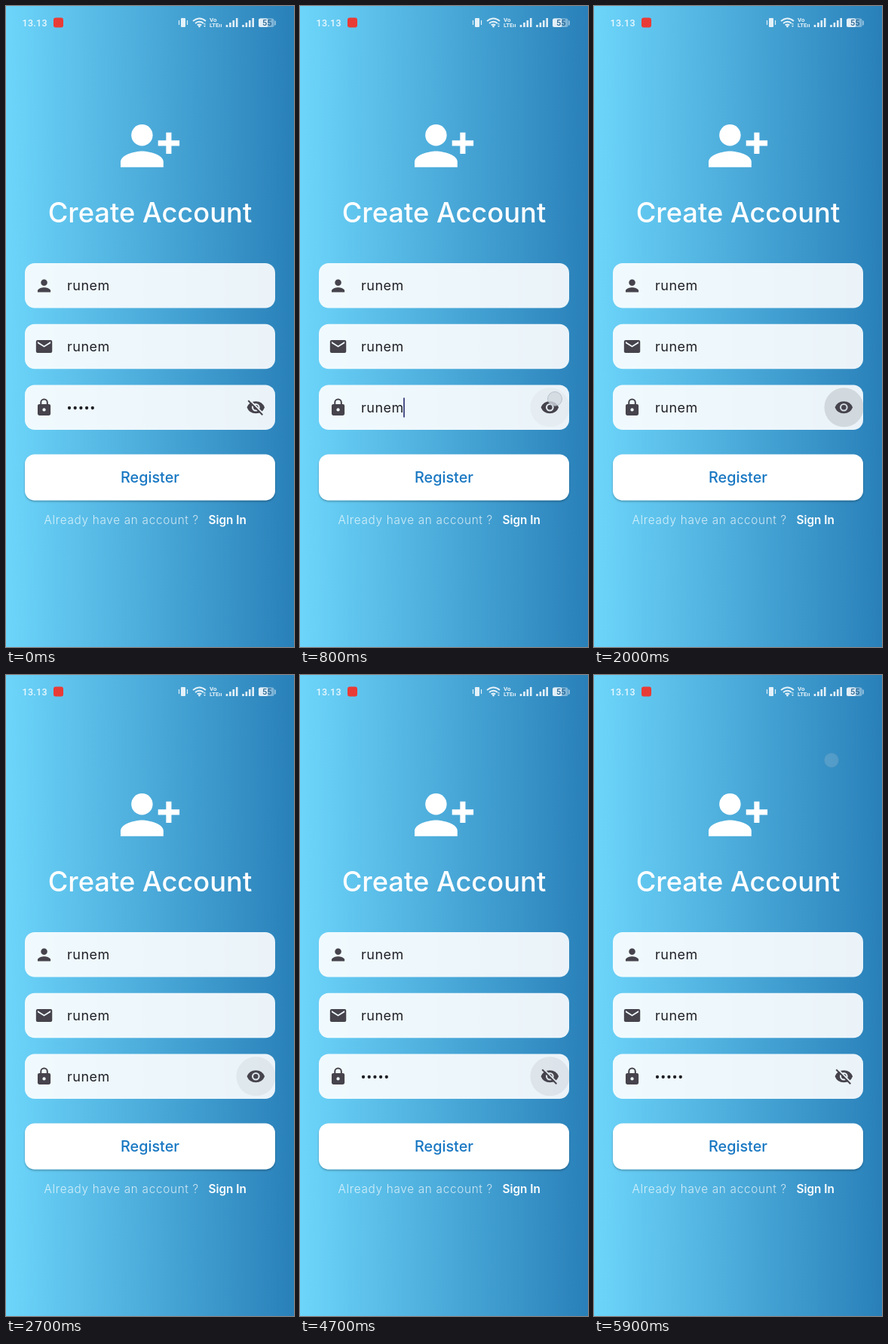
Write an HTML page that moves like this. It is 382 px wide and 850 px high and loops after 6000 ms.

```html
<!DOCTYPE html>
<html lang="en">
<head>
<meta charset="utf-8">
<title>Create Account</title>
<style>
  html, body { margin: 0; width: 100%; height: 100%; overflow: hidden; }
  svg { display: block; width: 100%; height: 100%; }
  text { font-family: Inter, sans-serif; }
  .status text { font-family: Roboto, sans-serif; font-weight: 500; }
  .name { font-size: 18px; letter-spacing: .5px; fill: #202027; }
  .icon { fill: #46434d; }
  .icon .hole { fill: #f0f9fd; }
</style>
</head>
<body>
<svg viewBox="0 0 382 850">
  <defs>
    <linearGradient id="sky">
      <stop stop-color="#6dd5fa"/><stop offset="1" stop-color="#2980b9"/>
    </linearGradient>
    <filter id="shadow" x="-5%" y="-10%" width="110%" height="130%">
      <feDropShadow dx="0" dy="1.5" stdDeviation="1.3" flood-opacity=".3"/>
    </filter>
    <rect id="box" x="25" width="332" height="59.5" rx="13"/>
    <clipPath id="inside"><use href="#box" y="502.5"/></clipPath>
    <path id="bars" d="M0 28v-3m4.4 3v-6m4.4 6v-9m4.4 9v-12" stroke="#fff" stroke-width="2.6"/>
    <g id="person">
      <circle cx="12" cy="8" r="4"/>
      <path d="M4 20v-2c0-2.66 5.33-4 8-4s8 1.34 8 4v2z"/>
    </g>
    <g id="eye">
      <path fill-rule="evenodd" d="M1 12a11.8 11.8 0 0 1 22 0 11.8 11.8 0 0 1-22 0zM7 12a5 5 0 0 0 10 0 5 5 0 0 0-10 0z"/>
      <circle cx="12" cy="12" r="3"/>
    </g>
    <mask id="slit">
      <rect width="24" height="24" fill="#fff"/>
      <path d="M3 1.5l20 20" stroke="#000" stroke-width="1.8"/>
    </mask>
  </defs>
  <rect width="382" height="850" fill="url(#sky)"/>

  <g class="status" fill="#fff" opacity=".86">
    <text x="21.5" y="26.5" font-size="12.5" letter-spacing=".3">13.13</text>
    <rect x="232" y="16" width="6" height="12" rx="1"/>
    <path d="M229.5 19v6m11-6v6" stroke="#fff" stroke-width="1.2"/>
    <path d="M248 20q8.5-7 17 0m-14 3q5.500-4.500 11 0m-8.300 2.500q2.800-2 5.600 0" fill="none" stroke="#fff" stroke-width="1.8"/>
    <circle cx="256.5" cy="27" r="1.4"/>
    <path d="M262 24.5l1.500-2 1.500 2zm0 1.500l1.500 2 1.500-2z"/>
    <text x="270" y="21" font-size="8" style="font-weight: 700">Vo</text>
    <text x="270" y="28" font-size="7.600" style="font-weight: 700">LTEıı</text>
    <use href="#bars" x="293"/><use href="#bars" x="314.500"/>
    <rect x="335" y="16.500" width="20.500" height="11.500" rx="2.500" opacity=".45"/>
    <rect x="335" y="16.500" width="12.500" height="11.500" rx="2.500"/>
    <path d="M356 19l2 1v5l-2 1z" opacity=".5"/>
    <text x="340" y="26.300" font-size="11" fill="#245f8c">55</text>
  </g>
  <rect x="63" y="15.500" width="13" height="13" rx="3" fill="#e93b36"/>

  <g fill="#fff" transform="translate(148.450 142.800) scale(3.550)">
    <use href="#person" x="-3"/>
    <path d="M15 10h3V7h2v3h3v2h-3v3h-2v-3h-3z"/>
  </g>
  <text x="191" y="286.500" font-size="36.300" font-weight="500" fill="#fff" text-anchor="middle">Create Account</text>

  <g fill="#fff" fill-opacity=".9">
    <use href="#box" y="341"/><use href="#box" y="421.800"/><use href="#box" y="502.500"/>
  </g>
  <g class="icon" transform="translate(37.700 358.200) scale(1.070)"><use href="#person"/></g>
  <g class="icon" transform="translate(37.700 438.700) scale(1.070)">
    <rect x="2" y="4" width="20" height="16" rx="2"/>
    <path class="hole" d="M4 6l8 5 8-5v2l-8 5-8-5z"/>
  </g>
  <g class="icon" transform="translate(37.700 519.400) scale(1.070)">
    <rect x="4" y="8" width="16" height="14" rx="2"/>
    <path d="M8 8V6a4 4 0 0 1 8 0v2" fill="none" stroke="#46434d" stroke-width="1.900"/>
    <circle class="hole" cx="12" cy="15" r="2"/>
  </g>
  <text class="name" x="81" y="377">runem</text>
  <text class="name" x="81" y="458">runem</text>

  <circle id="ripple" cx="331.500" cy="532.300" r="26" fill="#46414b" clip-path="url(#inside)"/>
  <g id="shown">
    <text class="name" x="81" y="539">runem</text>
    <g class="icon" transform="translate(318.500 519.400) scale(1.070)"><use href="#eye"/></g>
  </g>
  <g id="masked">
    <path d="M84 533h32" stroke="#202027" stroke-width="4.300" stroke-linecap="round" stroke-dasharray="0 7.700"/>
    <g class="icon" transform="translate(318.500 519.400) scale(1.070)">
      <g mask="url(#slit)"><use href="#eye"/></g>
      <path d="M2.600 3.600l17.800 17.800" stroke="#46434d" stroke-width="1.800"/>
    </g>
  </g>
  <path id="cursor" d="M0 519.500v26" stroke="#4a5388" stroke-width="2"/>

  <rect x="25" y="594.500" width="332" height="61" rx="13" fill="#fff" filter="url(#shadow)"/>
  <text x="191" y="631.500" font-size="19.800" font-weight="500" fill="#1877c2" text-anchor="middle">Register</text>
  <text x="50.500" y="686.500" font-size="15.300" font-weight="300" letter-spacing=".7" fill="#fff" fill-opacity=".75">Already have an account ?</text>
  <text x="268.500" y="686.500" font-size="15.300" font-weight="600" fill="#fff">Sign In</text>
  <circle id="touch" r="9.500" fill="#d2d8df" stroke="#8f99a5" stroke-opacity=".6"/>
</svg>
<script>
const $ = id => document.getElementById(id);
const clamp = v => Math.min(1, Math.max(0, v));
const show = (id, on) => { $(id).style.display = on ? '' : 'none'; };
const LOOP = 6000;

const touches = [
  { from: 740, to: 1200, x: 338, y: 521 },
  { from: 1050, to: 1700, x: 343, y: 524 },
  { from: 3200, to: 3600, x: 340, y: 524 },
  { from: 5000, to: LOOP, x: 315, y: 113, slide: 32 },
];
const presses = touches.filter(touch => touch.y > 500);

// Fast rise after a press, then a slow fade.
const ripple = age => .17 * clamp(age / 300) * clamp((2200 - age) / 1400);

function draw(t) {
  const begun = list => list.filter(touch => touch.from <= t).pop();
  const press = begun(presses);
  const visible = t >= presses[0].from && t < presses[2].from;
  show('shown', visible);
  show('masked', !visible);
  show('cursor', press && (t - press.from) % 1000 < 500);
  $('cursor').setAttribute('transform', `translate(${visible ? 138 : 119} 0)`);
  $('ripple').setAttribute('opacity', Math.max(...presses.map(p => ripple(t - p.from))));

  const touch = begun(touches);
  show('touch', touch);
  if (!touch) return;
  const { from, to, x, y, slide = 0 } = touch;
  const lag = slide * (1 - clamp((t - from) / 600)) ** 2;
  $('touch').setAttribute('transform', `translate(${x} ${y - lag})`);
  $('touch').setAttribute('opacity', .8 * clamp((t - from) / 60) * clamp((to - t) / 400));
}

const start = performance.now();
function tick() {
  draw((performance.now() - start) % LOOP);
  requestAnimationFrame(tick);
}
tick();
</script>
</body>
</html>
```
